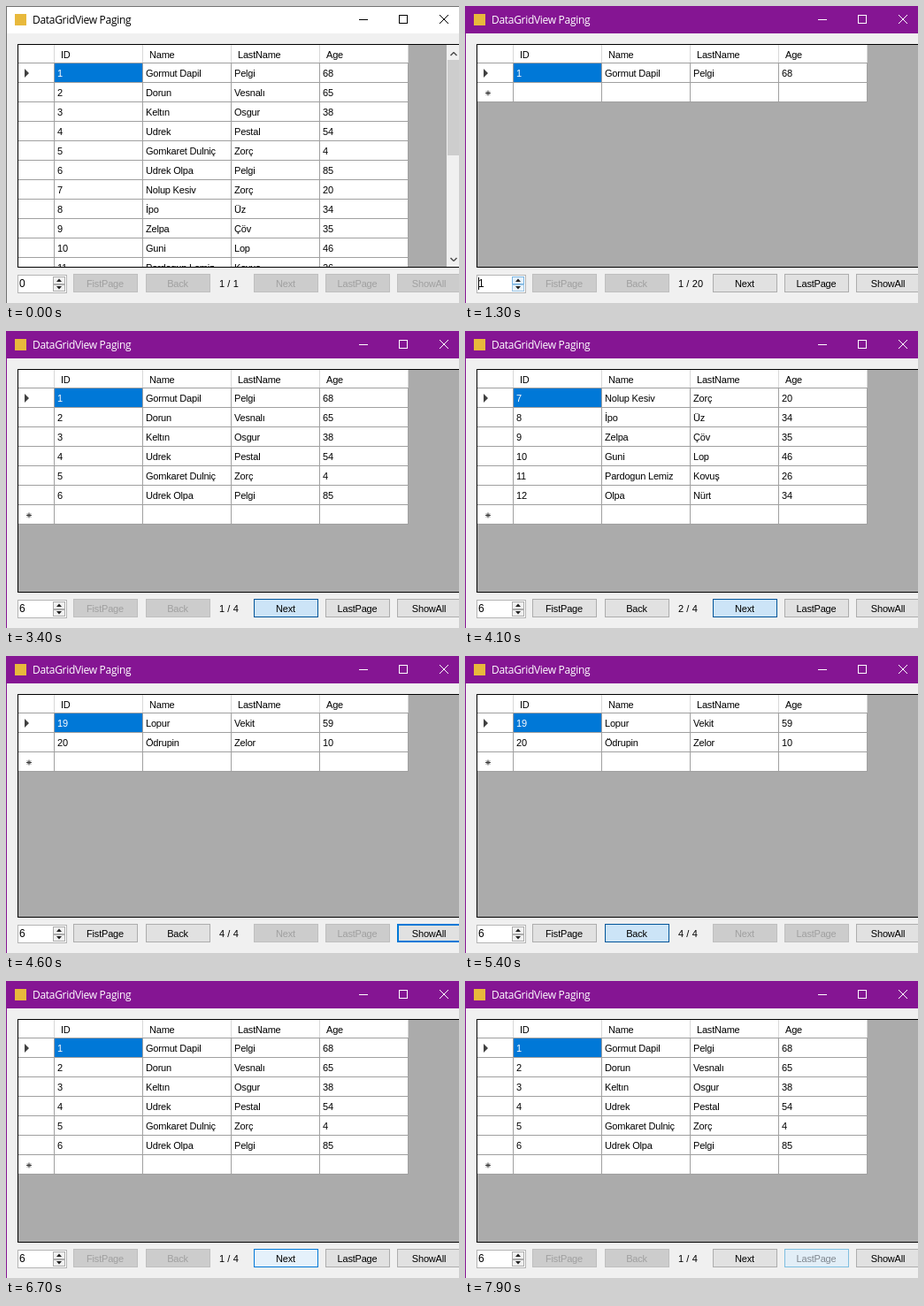
Write an HTML page with a canvas that moves like this. It is 512 px wide and 336 px high and loops after 8000 ms.

```html
<!DOCTYPE html>
<html lang="en">
<head>
<meta charset="utf-8">
<title>DataGridView Paging</title>
<style>
  html, body { margin: 0; width: 100%; height: 100%; overflow: hidden; background: #f0f0f0; }
  canvas { display: block; }
</style>
</head>
<body>
<canvas id="stage" width="512" height="336"></canvas>
<script>
const ctx = document.getElementById('stage').getContext('2d');
const LOOP = 8000;
const UI = '11px "Liberation Sans", Arial, sans-serif';
const BLUE = '#0078d7';

const people = `Gormut Dapil,Pelgi,68
Dorun,Vesnalı,65
Keltın,Osgur,38
Udrek,Pestal,54
Gomkaret Dulniç,Zorç,4
Udrek Olpa,Pelgi,85
Nolup Kesiv,Zorç,20
İpo,Üz,34
Zelpa,Çöv,35
Guni,Lop,46
Pardogun Lemiz,Kovuş,26
Olpa,Nürt,34
Börlemit,Ilduş,25
Üsenpa,Pelgi,24
Donrak,Ümgölt,32
Kobil,Kırdoz,43
Sorupan,Kırdoz,39
Nıpa,Uvdı,12
Lopur,Vekit,59
Ödrupin,Zelor,10`.split('\n').map((line, i) => [i + 1, ...line.split(',')]);

const buttons = [
  ['fist', 'FistPage', 76], ['back', 'Back', 158], ['next', 'Next', 280],
  ['last', 'LastPage', 361], ['all', 'ShowAll', 442]
];

// Each step changes part of the form's state at the given time.
const steps = [
  [0, { size: 0, page: 1 }],
  [1000, { spin: true }],
  [1300, { size: 1, active: true, caret: true }],
  [1600, { size: 2 }],
  [1900, { size: 3 }],
  [2200, { size: 4 }],
  [2500, { size: 5 }],
  [2800, { size: 6 }],
  [3000, { spin: false }],
  [3200, { hot: 'next' }],
  [3400, { down: 'next', focus: 'next', caret: false }],
  [3900, { page: 2, down: '' }],
  [4100, { down: 'next' }],
  [4200, { page: 3, down: '' }],
  [4400, { down: 'next' }],
  [4500, { page: 4, down: '', hot: '', focus: 'all' }],
  [5000, { hot: 'back' }],
  [5300, { down: 'back', focus: 'back' }],
  [5600, { page: 3, down: '' }],
  [5900, { hot: 'next' }],
  [6000, { hot: 'last' }],
  [6100, { hot: 'fist' }],
  [6300, { down: 'fist', focus: 'fist' }],
  [6400, { page: 1, down: '', focus: 'next' }],
  [6500, { hot: '' }],
  [6700, { hot: 'next' }],
  [6800, { hot: 'last' }],
  [7800, { down: 'last', focus: 'last' }],
  [7900, { down: '', fading: 'last' }]
];

function stateAt(t) {
  const s = {};
  for (const [at, patch] of steps) if (at <= t) Object.assign(s, patch);
  s.pages = s.size ? Math.ceil(people.length / s.size) : 1;
  return s;
}

function rect(x, y, w, h, color) {
  ctx.fillStyle = color;
  ctx.fillRect(x, y, w, h);
}

function box(x, y, w, h, fill, edge, line = 1) {
  rect(x, y, w, h, edge);
  rect(x + line, y + line, w - 2 * line, h - 2 * line, fill);
}

function text(str, x, y, color = '#000', align = 'left', font = UI, gap = '-0.2px') {
  ctx.font = font;
  ctx.letterSpacing = gap;
  ctx.textAlign = align;
  ctx.fillStyle = color;
  ctx.fillText(str, x, y);
}

function poly(points, color) {
  ctx.beginPath();
  points.forEach(([x, y]) => ctx.lineTo(x, y));
  ctx.fillStyle = color;
  ctx.fill();
}

function stroke(lines, color, width = 1) {
  ctx.beginPath();
  for (const [x1, y1, x2, y2] of lines) {
    ctx.moveTo(x1, y1);
    ctx.lineTo(x2, y2);
  }
  ctx.strokeStyle = color;
  ctx.lineWidth = width;
  ctx.stroke();
}

function drawWindow({ active }) {
  const ink = active ? '#fff' : '#000';
  const frame = active ? '#851593' : '#707070';
  rect(0, 0, 512, 336, '#f0f0f0');
  rect(0, 0, 512, 31, active ? frame : '#fff');
  rect(0, 0, 1, 336, frame);
  rect(0, 0, 512, 1, frame);
  rect(10, 9, 13, 13, '#e8b93c');
  text('DataGridView Paging', 30, 20, ink, 'left', '12px "Open Sans", "Noto Sans", sans-serif', '-0.3px');
  rect(399, 15, 10, 1, ink);
  ctx.strokeStyle = ink;
  ctx.lineWidth = 1;
  ctx.strokeRect(444.5, 10.5, 9, 9);
  stroke([[490, 10, 500, 20], [500, 10, 490, 20]], ink);
}

function drawRow(y, cells, first) {
  rect(14, y, 440, 21, '#fff');
  rect(14, y + 21, 441, 1, '#a0a0a0');
  if (first) {
    rect(55, y, 99, 21, BLUE);
    poly([[21, y + 6], [26, y + 11], [21, y + 16]], '#404040');
  }
  for (let c = 0; c < 5; c++) rect(54 + c * 100, y, 1, 22, '#a0a0a0');
  if (cells) {
    cells.forEach((v, c) => text(v, 58 + c * 100, y + 15, first && !c ? '#fff' : '#000'));
  } else {
    const my = y + 11.5;
    stroke([[23, my, 29, my], [26, my - 3, 26, my + 3],
      [24, my - 2, 28, my + 2], [28, my - 2, 24, my + 2]], '#404040');
  }
}

function drawScrollbar() {
  rect(498, 44, 14, 251, '#f0f0f0');
  rect(499, 61, 13, 108, '#cdcdcd');
  ctx.lineJoin = 'miter';
  stroke([[502.5, 56, 506, 52.5], [506, 52.5, 509.5, 56],
    [502.5, 285, 506, 288.5], [506, 288.5, 509.5, 285]], '#505050', 1.5);
}

function drawGrid({ size, page }) {
  rect(13, 43, 499, 253, '#000');
  rect(14, 44, 498, 251, '#ababab');
  ctx.save();
  ctx.beginPath();
  ctx.rect(14, 44, 498, 251);
  ctx.clip();
  rect(14, 44, 441, 20, '#fff');
  rect(14, 64, 441, 1, '#a0a0a0');
  ['ID', 'Name', 'LastName', 'Age'].forEach((h, c) => text(h, 62 + c * 100, 59));
  for (let c = 0; c < 5; c++) rect(54 + c * 100, 44, 1, 20, '#d8d8d8');
  const start = (page - 1) * size;
  const rows = size ? people.slice(start, start + size) : people;
  [...rows, null].forEach((cells, i) => drawRow(65 + i * 22, cells, i === 0));
  if (!size) drawScrollbar();
  ctx.restore();
}

function drawSpinner({ size, spin, caret }) {
  box(13, 304, 56, 21, '#fff', '#b4b4b4');
  text(size, 15, 318, '#000', 'left', '12px "Liberation Sans", Arial, sans-serif', '0px');
  if (caret) rect(15, 307, 1, 14, '#000');
  box(53, 306, 14, 9, spin ? '#e5f1fb' : '#f0f0f0', spin ? '#7ab5e3' : '#acacac');
  box(53, 315, 14, 8, spin ? '#eaf3fa' : '#f0f0f0', spin ? '#9cc6e6' : '#acacac');
  poly([[57, 312], [60, 308.5], [63, 312]], '#202020');
  poly([[57, 317], [60, 320.5], [63, 317]], '#202020');
}

function isEnabled(id, { size, page, pages }) {
  if (id === 'all') return size > 0;
  return id === 'fist' || id === 'back' ? page > 1 : page < pages;
}

function buttonLook(id, s) {
  if (!isEnabled(id, s)) return ['#cccccc', '#bfbfbf', '#a0a0a0'];
  if (s.fading === id) return ['#e2eef7', '#7fbfe0', '#808890'];
  if (s.down === id) return ['#cce4f7', '#005499', '#000'];
  if (s.hot === id) return ['#e5f1fb', BLUE, '#000'];
  if (s.focus === id) return ['#e1e1e1', BLUE, '#000', 2];
  return ['#e1e1e1', '#adadad', '#000'];
}

function drawButtons(s) {
  for (const [id, label, x] of buttons) {
    const [fill, edge, ink, line] = buttonLook(id, s);
    box(x, 303, 73, 21, fill, edge, line);
    text(label, x + 36, 318, ink, 'center');
  }
  text(`${s.page} / ${s.pages}`, 241, 318, '#000', 'left', UI, '0.1px');
}

function render(now) {
  const s = stateAt(now % LOOP);
  drawWindow(s);
  drawGrid(s);
  drawSpinner(s);
  drawButtons(s);
}

const began = performance.now();
function tick() {
  render(performance.now() - began);
  requestAnimationFrame(tick);
}
tick();
</script>
</body>
</html>
```
